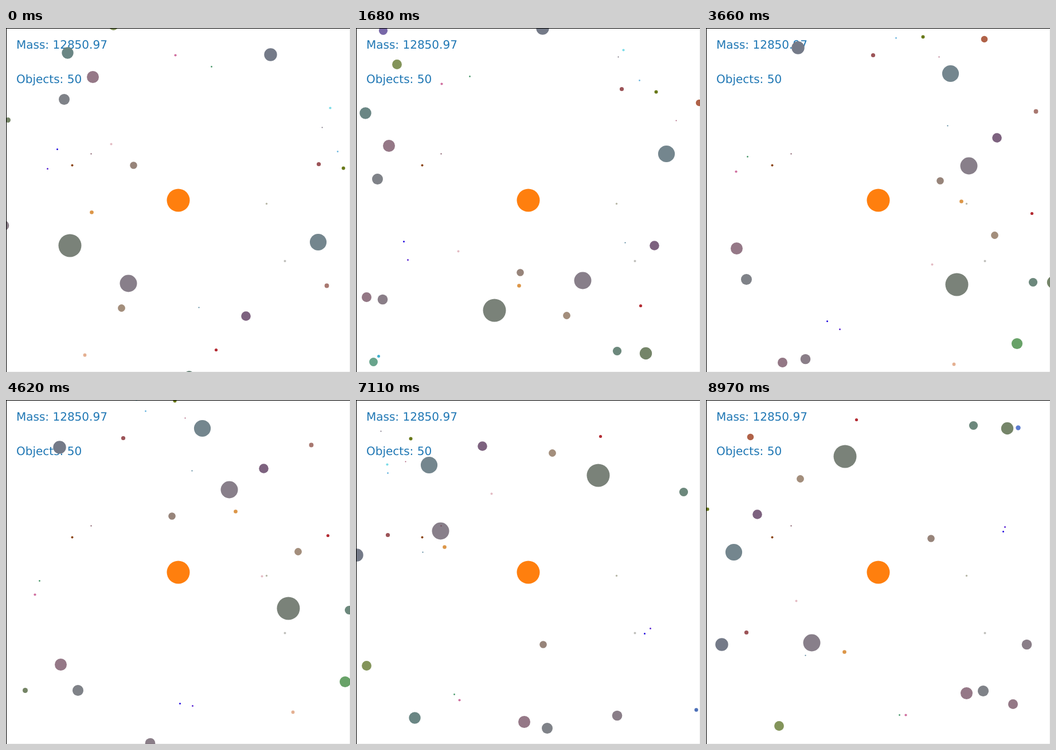
Write an HTML page that moves like this. It is 600 px wide and 600 px high and loops after 9 s.

```html
<!DOCTYPE html>
<html lang="en">
<head>
<meta charset="utf-8">
<title>Orbit simulation</title>
<style>
  html, body { margin: 0; width: 100%; height: 100%; overflow: hidden; background: #fff; }
  svg { display: block; width: 600px; height: 600px; }
  text { font: 20px "DejaVu Sans", sans-serif; fill: #1f77b4; text-rendering: geometricPrecision; }
</style>
</head>
<body>
<svg viewBox="0 0 600 600">
  <text x="18" y="36">Mass: 12850.97</text>
  <text x="18" y="96">Objects: 50</text>
  <g id="sky"></g>
  <rect x="0.5" y="0.5" width="600" height="600" fill="none" stroke="#000" stroke-width="1.11"/>
</svg>
<script>
const GM = 2000;      // px^3 per step^2
const STEP = 30;      // ms
const STEPS = 300;
const CENTER = 300;
const RAD = Math.PI / 180;
const { sin, cos, atan, sqrt, round } = Math;
const sky = document.getElementById('sky');
const bodies = [];

function dot(color, size, x = CENTER, y = CENTER) {
  const node = document.createElementNS('http://www.w3.org/2000/svg', 'circle');
  node.setAttribute('r', size);
  node.setAttribute('fill', color);
  sky.append(node);
  place(node, x, y);
  return node;
}

// Markers sit on whole pixels.
function place(node, x, y) {
  node.setAttribute('cx', round(x) + 0.5);
  node.setAttribute('cy', round(y) + 0.5);
}

// a: mean distance, phase: mean longitude at the start,
// e and peri: eccentricity and direction of the nearest point, in degrees.
function body(color, size, a, phase, e = 0, peri = 0) {
  bodies.push({
    a, e,
    peri: peri * RAD,
    start: (phase - peri) * RAD,
    rate: sqrt(GM / a ** 3),
    beta: e / (1 + sqrt(1 - e * e)),
    node: dot(color, size)
  });
}

function move({ a, e, peri, start, rate, beta, node }, step) {
  const M = start + rate * step;
  let E = M;
  for (let i = 0; i < 6; i++) E -= (E - e * sin(E) - M) / (1 - e * cos(E));
  const angle = peri + E + 2 * atan(beta * sin(E) / (1 - beta * cos(E)));
  const r = a * (1 - e * cos(E));
  place(node, CENTER + r * cos(angle), CENTER - r * sin(angle));
}

dot('#ff7f0e', 20);

// Nearly circular orbits
body('#887f8a', 15, 169.25, 238.9);
body('#74868e', 14.6, 254.5, -16.7);
body('#747a88', 11.2, 300.6, 57.7);
body('#758569', 10.7, 337, 284.3);
body('#957887', 10.5, 261.2, 124.7);
body('#6a8684', 10.2, 322, 126.9);
body('#68a268', 9.6, 348, 265.9);
body('#937785', 8.5, 328.5, 186.9);
body('#7d627f', 8.3, 234, 300.3);
body('#7868a8', 7.6, 389.5, 111.8);
body('#6c887c', 7.6, 305.5, 273.6);
body('#68a48c', 7.4, 390, 207.6);
body('#a38e7c', 6.4, 212.2, 242.1);
body('#9c5458', 3.6, 253.1, 14.3);
body('#4c70b8', 3.2, 378.8, 238.3);
body('#e4b092', 2.9, 315.2, 238.9);
body('#b42c34', 2.6, 268.9, 284.3);
body('#7cdce8', 2.1, 309.9, 31.3);
body('#d070a0', 2.1, 253.4, 91.1);
body('#2008e0', 1.5, 229, 157);
body('#5c28d4', 1.5, 234.6, 166.4);

// Elongated orbits
body('#7a8279', 20, 205.2, 205.5, 0.024, 286);
body('#7f8288', 9.5, 271, 139, 0.02, 150);
body('#8a7e88', 8.8, 296, 186.9, 0.038, 25);
body('#83945a', 8.4, 316, 106.1, 0.047, -20);
body('#97847a', 6.3, 113.6, 135.5, 0.141, 116);
body('#b06248', 5.8, 337.7, 10.7, 0.039, 145);
body('#748465', 4.5, 320.5, 149.2, 0.054, 35);
body('#5c7cd0', 4.2, 420, -35.8, 0.175, 70);
body('#a87870', 3.9, 317, 326.4, 0.066, 300);
body('#dc9648', 3.3, 148.9, 187.8, 0.026, 10);
body('#687818', 3, 309, 13.4, 0.054, 35);
body('#40b0d0', 2.5, 372, 199.4, 0.06, 120);
body('#e4bcc4', 2, 148.9, 139.2, 0.022, -20);
body('#509c70', 1.4, 245.2, 78, 0.027, 115);
body('#70b8e0', 1.4, 306.3, 23.3, 0.074, 68);
body('#508098', 1.1, 185.2, -76, 0.04, 60);
body('#a85874', 1, 340.5, 24.1, 0.21, 86);
body('#706878', 1, 325, 19.9, 0.148, 0);

// Specks at rest
dot('#8b4513', 2, 115, 239);
dot('#704050', 1.1, 148, 219);
dot('#b8b8a8', 1.7, 454, 306);
dot('#c0c0bc', 2, 486, 406);

let start, shown;
function tick(now) {
  start ??= now;
  const step = Math.max(0, Math.floor((now - start) / STEP)) % STEPS;
  if (step !== shown) {
    shown = step;
    for (const b of bodies) move(b, step);
  }
  requestAnimationFrame(tick);
}
tick(performance.now());
</script>
</body>
</html>
```
